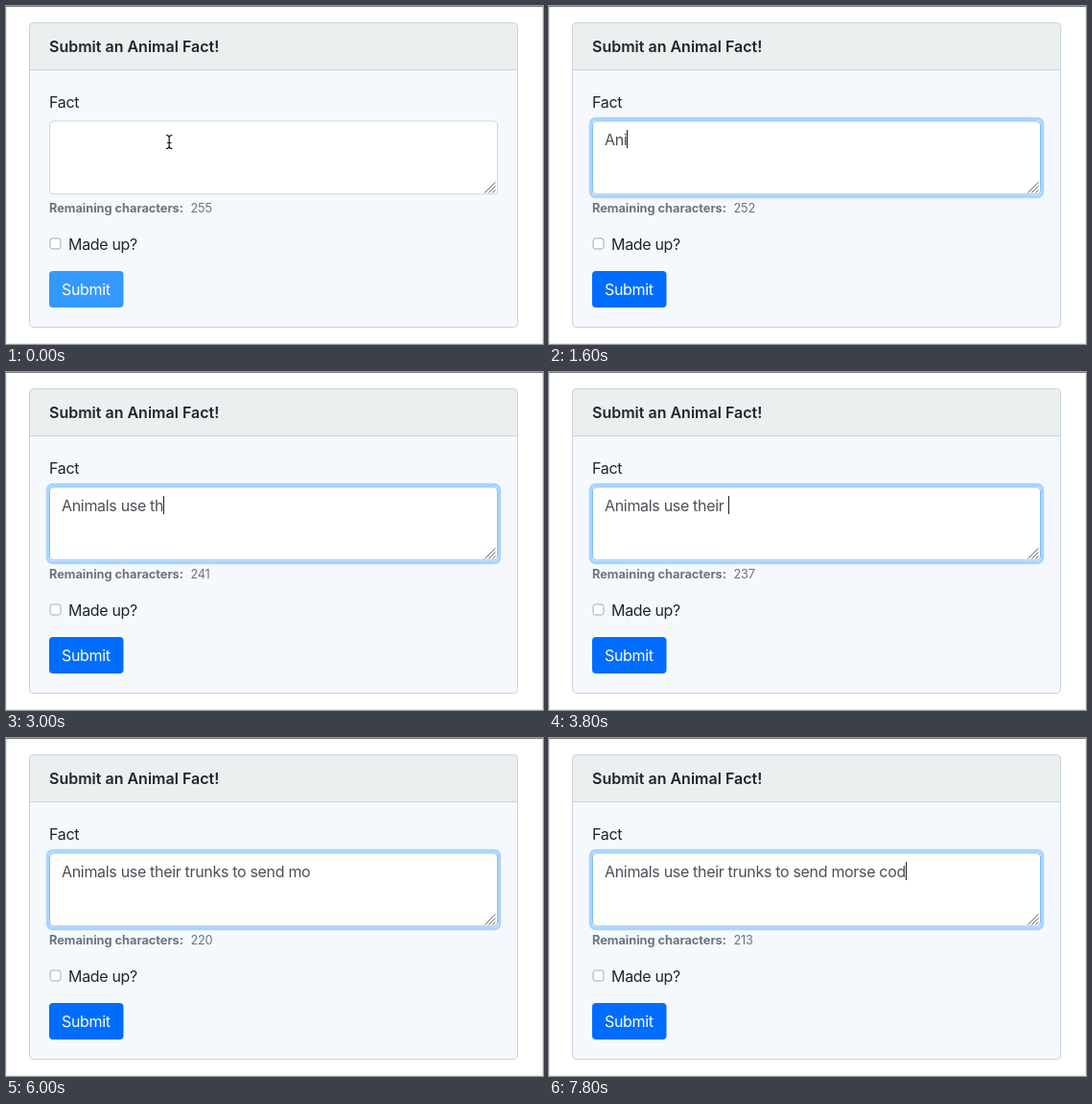
Recreate the animation shown at these times as an HTML page. Size 560 by 352 pixels, loop 8000 ms.

```html
<!DOCTYPE html>
<html lang="en">
<head>
<meta charset="utf-8">
<title>Submit an Animal Fact</title>
<style>
html, body { margin: 0; width: 100%; height: 100%; overflow: hidden; background: #fff; }
svg { display: block; width: 560px; height: 352px; }
text { font: 16px Inter, "Liberation Sans", sans-serif; letter-spacing: -.02em; fill: #212529; white-space: pre; }
.title { font-weight: 600; letter-spacing: 0; }
.small { font-size: 12.8px; fill: #6c757d; }
.bold { font-weight: 700; letter-spacing: -.003em; }
#typed { fill: #495057; }
</style>
</head>
<body>
<svg viewBox="0 0 560 352">
  <rect x=".5" y=".5" width="559" height="351" fill="#fff" stroke="#e6e6e6"/>
  <rect width="560" height="1" fill="#7c7c7c"/>

  <rect x="24.5" y="17.5" width="509" height="317" rx="4" fill="#f5f9fd"/>
  <path d="M24.5 66.5V21.5a4 4 0 0 1 4-4h501a4 4 0 0 1 4 4v45z" fill="#ebeff0"/>
  <path d="M24 66.5h510" stroke="#c9d3db"/>
  <rect x="24.5" y="17.5" width="509" height="317" rx="4" fill="none" stroke="#c9d3db"/>
  <text class="title" x="45" y="48">Submit an Animal Fact!</text>
  <text x="45" y="105.5">Fact</text>

  <rect id="ring" x="43.5" y="117.5" width="471" height="81" rx="5" fill="none" stroke="#a9d4ff" stroke-width="3.4"/>
  <rect id="area" x="45.5" y="119.9" width="467" height="76" rx="4" fill="#fff"/>
  <path d="M499.5 194.5l11-11M503.5 194.5l7-7M507.5 194.5l3-3" stroke="#6a6a6a"/>
  <text id="typed" x="58" y="145"></text>
  <rect id="caret" y="129" width="1" height="19" fill="#222"/>

  <text class="small bold" x="45" y="215">Remaining characters:</text>
  <text class="small" id="left" x="192.5" y="215"></text>

  <rect x="46" y="242" width="11" height="11" rx="2.5" fill="#fff" stroke="#a3a8ad"/>
  <text x="65" y="254">Made up?</text>

  <rect id="button" x="45" y="276" width="77.5" height="38" rx="4"/>
  <text x="58" y="301" style="fill:#fff">Submit</text>

  <g id="pointer" fill="none">
    <path id="beam" d="M167 134.5q3.2 0 3.2 2.5v9q0 2.5-3.2 2.5M173.4 134.5q-3.2 0-3.2 2.5M170.2 146q0 2.5 3.2 2.5M168 142.5h4.4" stroke="#111" stroke-width="1.2"/>
  </g>
</svg>
<script>
const $ = id => document.getElementById(id);
const fact = "Animals use their trunks to send morse cod";
const loop = 8000, step = 200;

// characters typed at each step, from 1000 ms on
const counts = [
  1, 1, 2, 3, 4, 5,
  7, 9, 11, 12, 14, 15,
  16, 17, 18, 20, 21, 22,
  24, 26, 28, 30, 31, 33, 33,
  35, 36, 36, 36, 36, 36,
  37, 39, 40, 42
];

function draw(now) {
  const t = Math.floor(now % loop / step) * step;
  const n = t < 1000 ? 0 : counts[(t - 1000) / step];
  const focus = t < 400 ? 0 : t < 600 ? .5 : 1;
  const blink = t === 6000 || (t >= 6600 && t < 7200);

  $("ring").style.opacity = focus;
  $("area").style.stroke = ["#ced4da", "#a7c9ed", "#80bdff"][focus * 2];
  $("typed").textContent = fact.slice(0, n);
  $("left").textContent = 255 - n;
  $("caret").setAttribute("x", Math.round(58 + (n ? $("typed").getComputedTextLength() : 0)));
  $("caret").style.opacity = focus && !blink ? 1 : 0;
  $("button").style.fill = t < 1000 ? "#3399ff" : t < 1200 ? "#1a83ff" : "#006dff";
  $("pointer").style.opacity = n ? 0 : 1;
}

function tick(now) {
  draw(now);
  requestAnimationFrame(tick);
}
draw(0);
requestAnimationFrame(tick);
</script>
</body>
</html>
```
